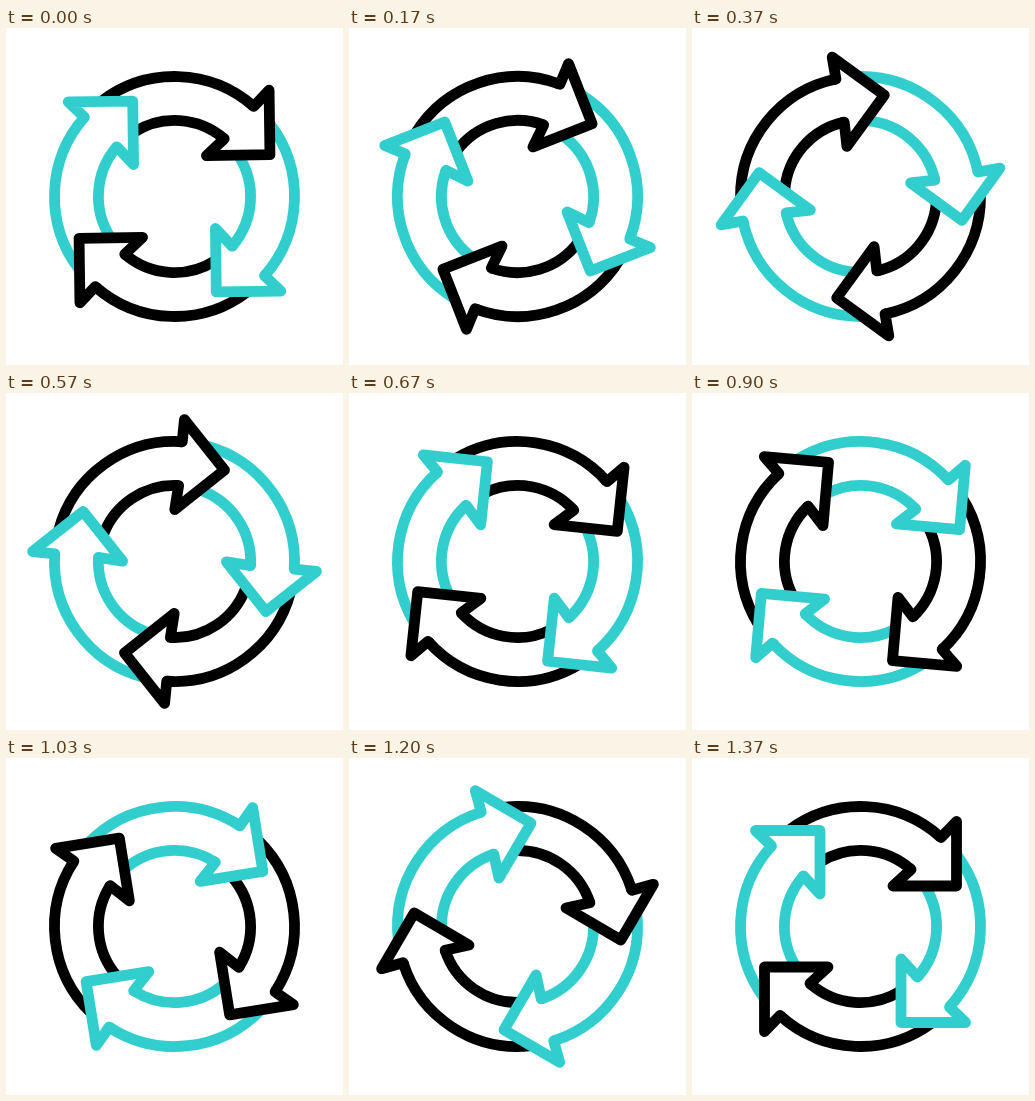
An HTML page that plays this animation: 337 px wide and 337 px high, repeating every 1.67 s.

```html
<!DOCTYPE html>
<html lang="en">
<head>
<meta charset="utf-8">
<title>Rotating arrows</title>
<style>
  html, body { margin: 0; width: 100%; height: 100%; overflow: hidden; background: #fff; }
  svg { display: block; width: 100vw; height: 100vh; }
  path { fill: none; stroke-width: 10.8; stroke-linejoin: round; }
  .black { stroke: #000; }
  .teal { stroke: #32cece; }
</style>
</head>
<body>
<svg viewBox="0 0 337 337">
  <g id="wheel"></g>
</svg>
<script>
  const LOOP = 1670, FPS = 30, CENTER = 168.5;
  const BANDS = 'M-72-96A120 120 0 0 1 80.5-89M50.5-57A76 76 0 0 0-40.5-64.3';
  const HEAD = 'M78.4-90.8L80.5-89L96-105V-40.5H32.5L50.5-57L48.4-58.5';
  const wheel = document.getElementById('wheel');

  // Bands first, so every head lies over its neighbour's tail.
  for (const d of [BANDS, HEAD]) {
    for (let i = 0; i < 4; i++) {
      const path = document.createElementNS('http://www.w3.org/2000/svg', 'path');
      path.setAttribute('d', d);
      path.setAttribute('class', i % 2 ? 'teal' : 'black');
      path.setAttribute('transform', `rotate(${i * 90})`);
      wheel.append(path);
    }
  }

  // [step, degrees], eased in and out between neighbours
  const KEYS = [[-1, 0], [13.8, -59.5], [27.65, 96], [41, 0]];
  const ease = u => u * u * (3 - 2 * u);

  function angleAt(step) {
    for (let i = 1; i < KEYS.length; i++) {
      const [t0, a0] = KEYS[i - 1], [t1, a1] = KEYS[i];
      if (step < t1) return a0 + (a1 - a0) * ease((step - t0) / (t1 - t0));
    }
    return 0;
  }

  function draw(now) {
    const step = Math.floor((now % LOOP + 5) * FPS / 1000);
    wheel.setAttribute('transform',
      `translate(${CENTER} ${CENTER}) rotate(${angleAt(step).toFixed(3)})`);
  }

  let start;
  function tick(now) {
    start ??= now;
    draw(now - start);
    requestAnimationFrame(tick);
  }
  draw(0);
  requestAnimationFrame(tick);
</script>
</body>
</html>
```
